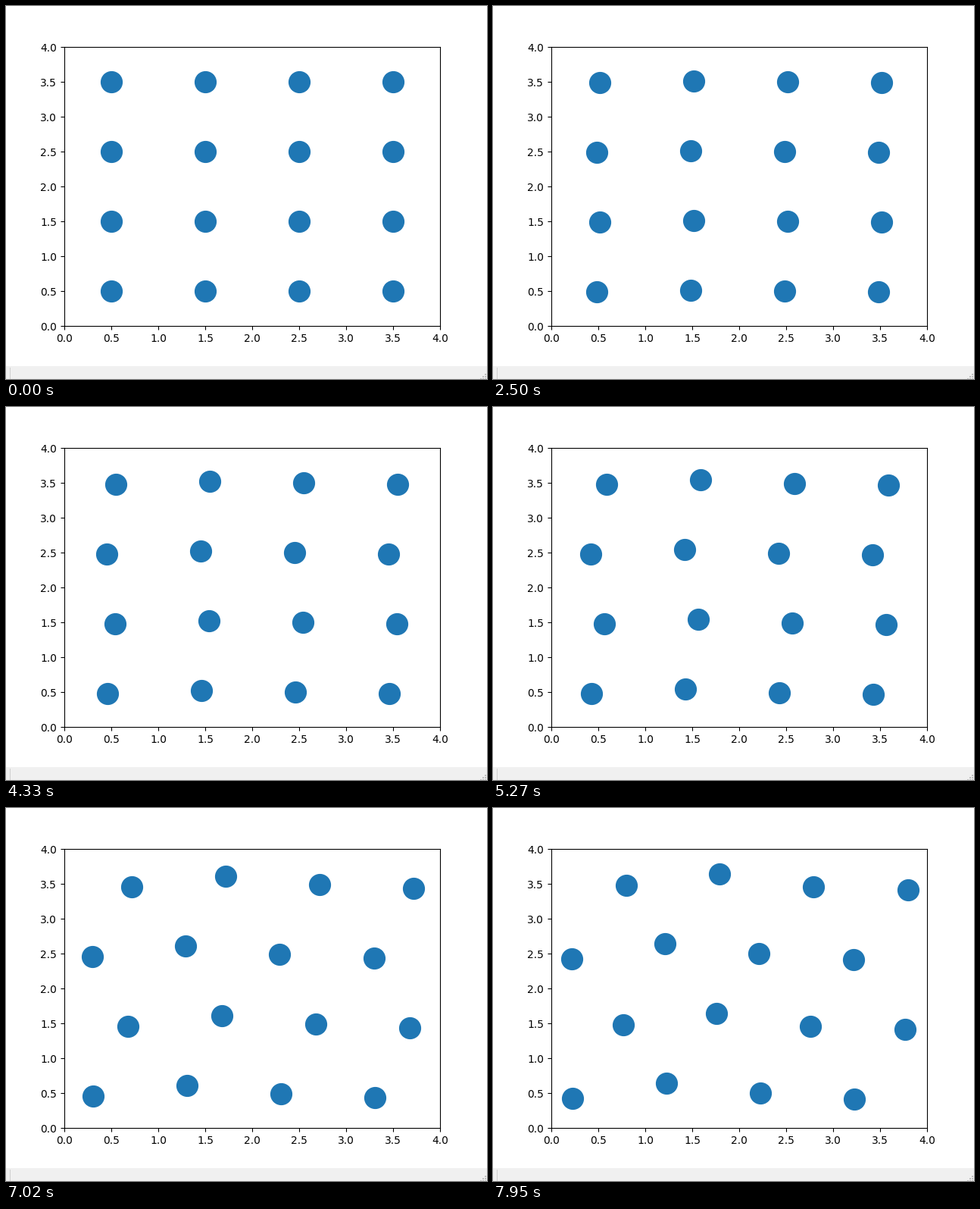
Recreate the animation shown at these times as a matplotlib script. Size 635 by 492 pixels, loop 8000 ms.

```python
import numpy as np
import matplotlib.pyplot as plt
from matplotlib.animation import FuncAnimation
from matplotlib.patches import Circle, Rectangle

W, H, DPI = 635, 492, 100
INTERVAL, FRAMES = 50, 160
CANVAS_H = 475                      # plot canvas; the status bar lies below
BLUE = "#1f77b4"

COL = np.arange(4)[None, :]
ROW = np.arange(4)[:, None]
SIDE = 1 - 2 * (ROW % 2)            # rows drift right and left in turn
LAG = np.array([[0], [0.13], [0.47], [0.27]])   # seconds behind the top row


def drift(t, rate=0.57, scale=1.11, limit=42.2):
    """Unstable growth in pixels that levels off towards the limit."""
    free = scale * np.sinh(rate * t)
    return free / np.cbrt(1 + np.abs(free / limit) ** 3)


def centers(t):
    """Dot centres after t seconds, snapped to whole pixels."""
    g = drift(t - LAG)
    dx = g * (SIDE + 0.01 * np.cos(2 * np.pi * COL / 3))

    # Outer columns sag, the second rises, the third hardly moves.
    g = drift(t)
    dy = np.array([0.63 * g**0.55, -0.375 * g, 0.055 * g, 0.9 * g**0.55])[None, :]
    # Late on, neighbouring rows begin to swing apart.
    swing = 2.3 * (max(t - 7, 0) / 0.95) ** 2
    dy = dy + swing * (0.5 * (COL % 2) - SIDE * np.cos(np.pi * COL / 2))

    x = 139 + 124 * COL + np.floor(dx + 0.5)
    y = 100 + 92 * ROW + np.floor(dy + 0.5)
    return np.column_stack([x.ravel(), y.ravel()]) + 0.5


fig = plt.figure(figsize=(W / DPI, H / DPI), dpi=DPI, facecolor="white")

bottom = H - CANVAS_H + 0.11 * 478
# The slight nudge keeps centred tick labels from rounding down.
plot = fig.add_axes([77.01 / W, bottom / H, 496 / W, 0.77 * 478 / H])
ticks = np.arange(0, 4.1, 0.5)
plot.set(xlim=(0, 4), ylim=(0, 4), xticks=ticks, yticks=ticks)

stage = fig.add_axes([0, 0, 1, 1])
stage.set(xlim=(0, W), ylim=(H, 0))
stage.axis("off")


def box(x, y, w, h, color):
    stage.add_patch(Rectangle((x, y), w, h, facecolor=color, linewidth=0))


box(0, CANVAS_H, W, H - CANVAS_H, "#f0f0f0")
box(5, 477, 1, 15, "#d0d0d0")
for i in range(3):                  # size grip
    for j in range(i + 1):
        box(632 - 3 * j, 485 + 3 * i, 2, 2, "#bfbfbf")

radius = 10 * DPI / 72
dots = [stage.add_patch(Circle(c, radius, facecolor=BLUE, edgecolor=BLUE, linewidth=1))
        for c in centers(0)]


def update(frame):
    for dot, c in zip(dots, centers(frame * INTERVAL / 1000)):
        dot.center = c
    return dots


anim = FuncAnimation(fig, update, frames=FRAMES, interval=INTERVAL,
                     repeat=True, repeat_delay=0, blit=False)
plt.show()
```
